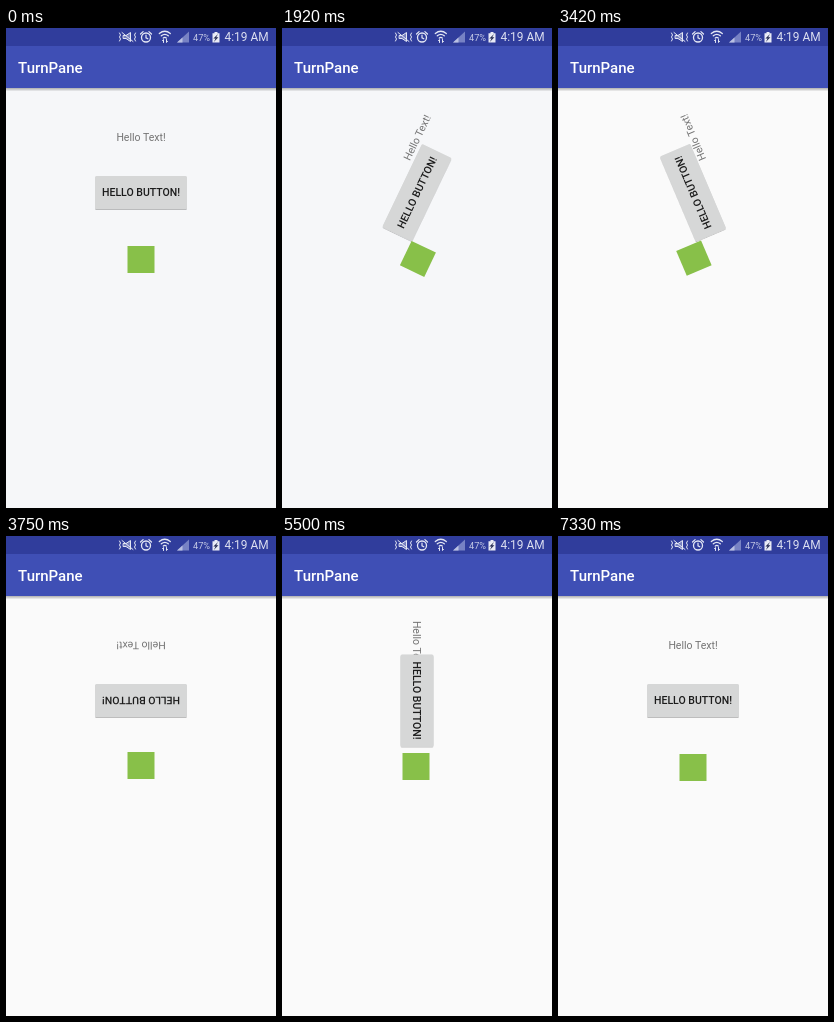
Write an HTML page that moves like this. It is 270 px wide and 480 px high and loops after 7.41 s.

```html
<!DOCTYPE html>
<html lang="en">
<head>
<meta charset="utf-8">
<title>Turning views</title>
<style>
  html, body { margin: 0; width: 100%; height: 100%; overflow: hidden; background: #fafafa; }
  svg { display: block; width: 100%; height: 100%; font-family: Roboto, "Noto Sans", sans-serif; }
  .line { fill: none; stroke: #e4e7f4; stroke-linecap: round; }
  .medium { font-weight: 500; }
</style>
</head>
<body>
<svg viewBox="0 0 270 480">
  <defs>
    <linearGradient id="shade" x2="0" y2="1">
      <stop stop-color="#000" stop-opacity=".3"/>
      <stop offset="1" stop-color="#000" stop-opacity="0"/>
    </linearGradient>
    <filter id="lift" x="-20%" y="-20%" width="140%" height="140%">
      <feDropShadow dx="0" dy=".8" stdDeviation=".6" flood-opacity=".3"/>
    </filter>
  </defs>

  <rect id="page" width="270" height="480"/>
  <rect y="60" width="270" height="3.5" fill="url(#shade)"/>
  <rect width="270" height="60" fill="#3f4fb5"/>
  <rect width="270" height="18" fill="#303d9c"/>

  <!-- status bar -->
  <g class="line" stroke-width="1">
    <path d="M113.500 5l1 2-1 2 1 2-1 2M129.500 5l-1 2 1 2-1 2 1 2M116 4.500l11 9"/>
    <path d="M117.500 7.500h2.500l4.500-3v9l-4.500-3h-2.500z" fill="#e4e7f4" fill-opacity=".4"/>
    <circle cx="140" cy="9.500" r="4.500" stroke-width="1.300"/>
    <path d="M140 7v2.800l1.800 1M134.500 6l2.600-2.400M145.500 6l-2.600-2.400" stroke-width="1.200"/>
    <path d="M153.300 5.500q5.500-4.500 11 0M155.300 7.800q3.500-3 7 0M157.300 10q1.500-1.200 3 0" stroke-width="1.300"/>
    <path d="M157.500 14.500v-3l-1 1.200M160.500 11.500v3l1-1.200" stroke-width="1"/>
  </g>
  <path d="M171 14.500L183 3.500V14.500z" fill="#7782c4"/>
  <path d="M171 14.500L176.500 9.500V14.500z" fill="#b9c0e2"/>
  <path d="M208.500 4h3v1.200h2V14.500h-7V5.200h2z" fill="#e9ebf6"/>
  <path d="M212 6l-4.600 4.600h2.200l-1.800 3.400 4.600-4.800h-2.200z" fill="#252b52"/>
  <g fill="#dde0f1">
    <text x="187" y="13" font-size="9.2" fill="#c5cae6">47%</text>
    <text x="218.500" y="13.300" font-size="11.9">4:19 AM</text>
  </g>
  <text class="medium" x="12" y="45" font-size="15" fill="#fff">TurnPane</text>

  <!-- turning views -->
  <g text-anchor="middle" font-size="10.5">
    <g class="view" data-center="135 109.5">
      <text x="135" y="113.300" fill="#737373">Hello Text!</text>
    </g>
    <g filter="url(#lift)">
      <g class="view" data-center="135 164.5">
        <rect x="89" y="148" width="92" height="33" rx="1.500" fill="#d6d7d7"/>
        <text class="medium" x="135" y="168.200" fill="#1b1b1b">HELLO BUTTON!</text>
      </g>
    </g>
    <g class="view" data-center="135 230.5">
      <rect x="121.500" y="218" width="27" height="27" fill="#88c049"/>
    </g>
  </g>
</svg>
<script>
  const LOOP = 7410, STEP = 1000 / 12, TURN = 400;
  // Quarter turns: time of the first visible step, and time already run by then
  const turns = [[1750, 20], [3420, 55], [5000, 20], [6830, 55]];
  const views = [...document.querySelectorAll('.view')];
  const page = document.getElementById('page');

  const decelerate = x => 1 - (1 - x) ** 2;

  function quarterTurn(t, [begin, lead]) {
    if (t < begin) return 0;
    const elapsed = lead + Math.floor((t - begin + 4) / STEP) * STEP;
    return 90 * decelerate(Math.min(1, elapsed / TURN));
  }

  function draw(t) {
    const angle = turns.reduce((sum, turn) => sum - quarterTurn(t, turn), 0);
    for (const view of views) {
      view.setAttribute('transform', `rotate(${angle} ${view.dataset.center})`);
    }
    page.setAttribute('fill', t < 2000 ? '#f6f7f9' : '#fafafa');
  }

  const start = performance.now();
  function tick() {
    draw((performance.now() - start) % LOOP);
    requestAnimationFrame(tick);
  }
  tick();
</script>
</body>
</html>
```
